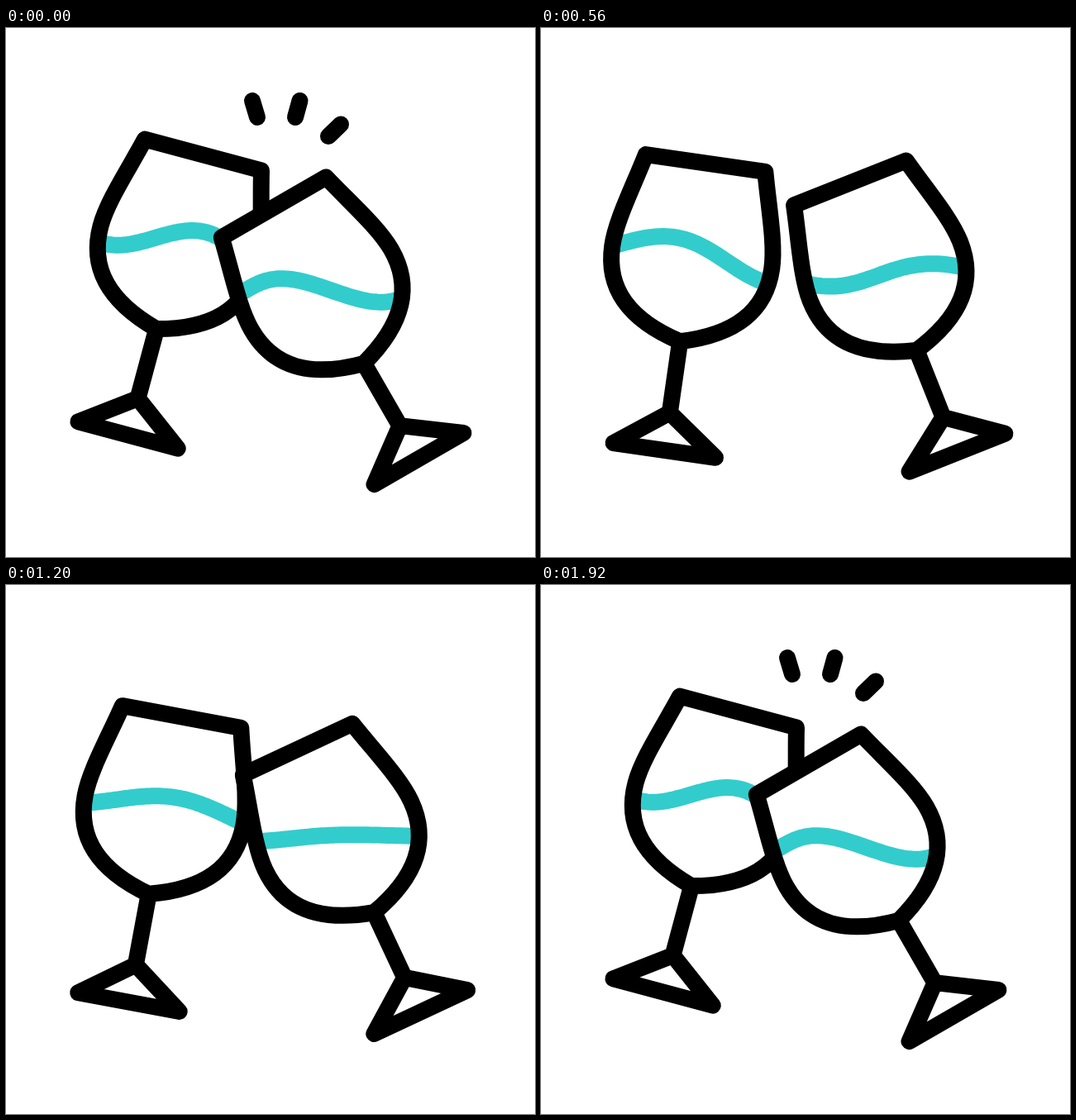
Animation of 640 by 640 pixels, one loop 2000 ms. Source, as an HTML page with a canvas:

```html
<!DOCTYPE html>
<html>
<head>
<meta charset="utf-8">
<title>Cheers</title>
<style>
html, body { margin: 0; width: 100%; height: 100%; overflow: hidden; background: #fff; }
canvas { display: block; width: 100vmin; height: 100vmin; }
</style>
</head>
<body>
<canvas width="640" height="640"></canvas>
<script>
const ctx = document.querySelector('canvas').getContext('2d');
const LOOP = 2000, STEP = 40;

// Glass in its own space: origin at the middle of the rim, axis pointing down.
const bowl = new Path2D('M-73 0H73C83 42 97.5 84 97.5 115C97.5 168 64 201 0 218' +
  'C-64 201 -97.5 168 -97.5 115C-97.5 84 -83 42 -73 0Z');
const foot = new Path2D('M0 218V305L62.3 351H-62.3L0 305');

const rad = deg => deg * Math.PI / 180;
const mix = (a, b, p) => a + (b - a) * p;

function ease(t, from, to) {
  const u = Math.min(1, Math.max(0, (t - from) / (to - from)));
  return u * u * (3 - 2 * u);
}

// Liquid height across the glass: a tilted cosine with its crest at the given place.
const wave = (level, slope, height, crest, degrees) =>
  x => level + slope * x - height * Math.cos(rad(degrees * (x - crest)));

const glasses = [
  {
    x: 238.5, y: 153.5, tilt: 15, pivot: [302, 488],
    turn: t => -8.7 * (ease(t, 147, 735) - ease(t, 951, 1460)),
    rest: wave(112, 0, 22.5, 28, 1.55),
    apart: wave(113.5, 0, 24, -36, 1.35),
    splash: wave(108, 0, 30, 57, 1.25)
  },
  {
    x: 324, y: 217, tilt: -30, pivot: [552, 545],
    turn: t => 9 * (ease(t, 152, 642) - ease(t, 980, 1448)),
    rest: wave(116, 0.577, 16.5, -35, 2),
    apart: wave(120, 0.384, 23.5, 58, 1.5),
    splash: wave(114.5, 0.577, 18, -45, 1.7)
  }
];

// Outer end, inner end.
const sparks = [[298, 88, 304, 108], [355.5, 88, 350, 108], [405, 116.5, 390, 131]];

function drawWave({ rest, apart, splash }, t) {
  const part = ease(t, 198, 706), hit = ease(t, 940, 1460), settle = ease(t, 1540, 1920);
  ctx.beginPath();
  for (let x = -99; x <= 99; x += 3) {
    const swung = mix(mix(rest(x), apart(x), part), splash(x), hit);
    ctx.lineTo(x, mix(swung, rest(x), settle));
  }
  ctx.strokeStyle = '#33cccc';
  ctx.stroke();
}

function drawGlass(glass, t) {
  const [px, py] = glass.pivot;
  ctx.save();
  ctx.translate(px, py);
  ctx.rotate(rad(glass.turn(t)));
  ctx.translate(glass.x - px, glass.y - py);
  ctx.rotate(rad(glass.tilt));
  ctx.fill(bowl);
  ctx.save();
  ctx.clip(bowl);
  drawWave(glass, t);
  ctx.restore();
  ctx.strokeStyle = '#000';
  ctx.stroke(foot);
  ctx.stroke(bowl);
  ctx.restore();
}

function drawSparks(t) {
  const size = 1 - ease(t, 246, 526) + ease(t, 1320, 1540);
  if (size <= 0) return;
  ctx.strokeStyle = '#000';
  for (const [x, y, x2, y2] of sparks) {
    ctx.beginPath();
    ctx.moveTo(x, y);
    ctx.lineTo(mix(x, x2, size), mix(y, y2, size));
    ctx.stroke();
  }
}

const start = performance.now();

function frame() {
  const t = Math.floor((performance.now() - start) % LOOP / STEP) * STEP;
  ctx.fillStyle = '#fff';
  ctx.fillRect(0, 0, 640, 640);
  ctx.lineWidth = 20;
  ctx.lineCap = ctx.lineJoin = 'round';
  for (const glass of glasses) drawGlass(glass, t);
  drawSparks(t);
  requestAnimationFrame(frame);
}
frame();
</script>
</body>
</html>
```
